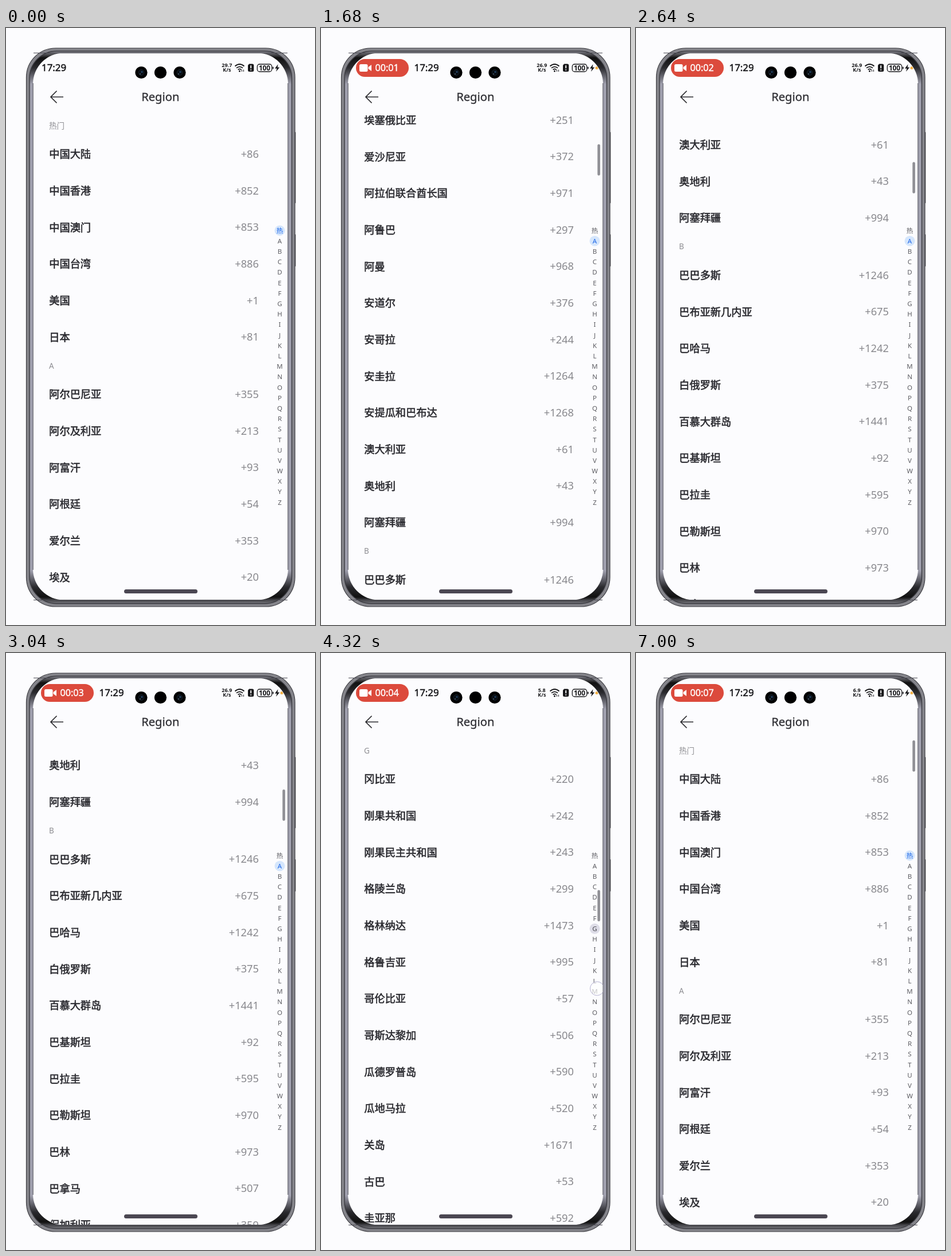
Write an HTML page that moves like this. It is 539 by 1039 pixels and loops after 7160 ms.

```html
<!DOCTYPE html>
<html lang="zh-CN">
<head>
<meta charset="utf-8">
<title>Region</title>
<style>
html, body { margin: 0; width: 100%; height: 100%; overflow: hidden; background: #fcfcfe; }
svg { display: block; width: 539px; height: 1039px; }
text { font-family: "Noto Sans", "Noto Sans CJK SC", sans-serif; }
.name { font: 18.2px "Noto Sans CJK SC", "Noto Sans CJK", sans-serif; fill: #2b2b30; stroke: #2b2b30; stroke-width: .6px; }
.code { font-size: 18.3px; fill: #88888d; text-anchor: end; }
.head { font-size: 13.5px; fill: #8e8e93; }
.idx { font-size: 11.5px; fill: #5c5c62; text-anchor: middle; }
.mid { text-anchor: middle; }
.bold { font-weight: 700; }
</style>
</head>
<body>
<svg viewBox="0 0 539 1039">
  <defs>
    <linearGradient id="rim" x2="0" y2="1">
      <stop offset="0" stop-color="#8a8a92"/><stop offset=".012" stop-color="#111"/>
      <stop offset=".03" stop-color="#2a2a2e"/><stop offset=".06" stop-color="#a0a0ae"/>
      <stop offset=".94" stop-color="#a0a0ae"/><stop offset=".97" stop-color="#2a2a2e"/>
      <stop offset=".988" stop-color="#111"/><stop offset="1" stop-color="#77777e"/>
    </linearGradient>
    <clipPath id="screen"><rect x="47.5" y="44" width="444" height="951" rx="54"/></clipPath>
    <clipPath id="view"><rect x="47" y="152" width="445" height="843"/></clipPath>
  </defs>

  <g fill="#55555b">
    <rect x="502" y="181" width="3.4" height="124" rx="1"/>
    <rect x="502" y="359" width="3.4" height="56" rx="1"/>
  </g>
  <rect x="35.5" y="35" width="468.5" height="972" rx="51" fill="#85858b" stroke="#3c3c42" stroke-width="1.2"/>
  <rect x="41" y="40.3" width="457.5" height="961.5" rx="47" fill="url(#rim)" stroke="#3a3a40" stroke-width="1.4"/>
  <rect x="47" y="43.5" width="445" height="952" rx="54" fill="#fcfcfe"/>
  <path d="M48 43.5H491M48 995.5H491M47.2 96V943M491.8 96V943" stroke="#4c4c54"/>

  <g clip-path="url(#screen)">
    <g clip-path="url(#view)"><g id="list"></g></g>
    <g id="index"><circle id="mark" cx="477.5" r="9"/></g>
    <rect id="bar" x="482.3" width="4.6" height="54.5" rx="2.3" fill="#8f8f95"/>
    <circle id="touch" cx="481.5" r="12" fill="#fff" fill-opacity=".65" stroke="#b4b0d0" stroke-width="1"/>
    <rect x="206" y="977" width="128" height="7" rx="3.5" fill="#4b4752"/>

    <path d="M100 120H78.5M88.5 109.5L78 120L88.5 130.5" fill="none" stroke="#2a2a2e" stroke-width="1.7"/>
    <text x="269.3" y="127" class="mid" font-size="20.2" fill="#2f2f34" stroke="#2f2f34" stroke-width=".3">Region</text>

    <g id="pill">
      <rect id="pillBox" x="61" y="54" height="31" rx="15.5" fill="#dc4a3c"/>
      <g id="pillIn" fill="#fff">
        <rect x="67" y="63" width="14.5" height="13" rx="2.5"/>
        <path d="M82.5 68L88 64V75L82.5 71Z"/>
        <text id="timer" x="94.5" y="75.3" font-size="16.2" stroke="#fff" stroke-width=".4"></text>
      </g>
    </g>
    <text id="clock" y="75.4" font-size="16.9" fill="#17171a" stroke="#17171a" stroke-width=".5">17:29</text>

    <g fill="#17171a">
      <text id="speed" x="385.3" y="68" class="mid bold" font-size="9"></text>
      <text x="385.3" y="76.4" class="mid bold" font-size="9">K/s</text>
      <g fill="none" stroke="#17171a" stroke-width="1.7">
        <path d="M399.5 66.5Q407.5 59.5 415.5 66.5M402 69.7Q407.5 65 413 69.7M404.6 72.6Q407.5 70.2 410.4 72.6"/>
      </g>
      <circle cx="407.5" cy="75" r="1.5"/>
      <path d="M411.5 76V72.5M414.5 72.5V76" stroke="#17171a"/>
      <path d="M424 62.5H430Q432.3 62.5 432.3 65V73.5Q432.3 76 430 76H424.5Q422 76 422 73.5V65Z"/>
      <path d="M427.2 65V70.2M427.2 72V73.8" stroke="#fff" stroke-width="1.8"/>
      <g id="battery">
        <rect x="438.3" y="63" width="25.4" height="13" rx="4" fill="none" stroke="#17171a" stroke-width="1.3"/>
        <text x="451" y="73.8" class="mid bold" font-size="11.8">100</text>
        <rect x="464.8" y="67.5" width="1.8" height="4" rx=".8"/>
        <path d="M474.5 63L469 70.5H472.5L471 76L477.2 68.4H473.6Z"/>
      </g>
    </g>
    <g id="mic">
      <circle r="9" fill="#f3b045"/>
      <g id="micIcon" fill="none" stroke="#fff" stroke-width="1.3">
        <rect x="-1.7" y="-5" width="3.4" height="6.5" rx="1.7" fill="#fff" stroke="none"/>
        <path d="M-3.8 -.5Q-3.5 3.4 0 3.4T3.8 -.5M0 3.4V5.6"/>
      </g>
    </g>
  </g>

  <g id="cameras">
    <circle cx="269.5" cy="77.5" r="10.6"/>
  </g>
</svg>
<script>
const $ = id => document.getElementById(id);
const LOOP = 7160, TOP = 151.5, ROW = 63.67, HEAD = 36;
const LETTERS = '热ABCDEFGHIJKLMNOPQRSTUVWXYZ';
const hotEnd = HEAD + 6 * ROW, aEnd = hotEnd + HEAD + 18 * ROW;

// letter, scroll position, rows
const sections = [
  ['热', 0, '中国大陆 86,中国香港 852,中国澳门 853,中国台湾 886,美国 1,日本 81'],
  ['A', hotEnd, '阿尔巴尼亚 355,阿尔及利亚 213,阿富汗 93,阿根廷 54,爱尔兰 353,埃及 20,埃塞俄比亚 251,爱沙尼亚 372,阿拉伯联合酋长国 971,阿鲁巴 297,阿曼 968,安道尔 376,安哥拉 244,安圭拉 1264,安提瓜和巴布达 1268,澳大利亚 61,奥地利 43,阿塞拜疆 994'],
  ['B', aEnd, '巴巴多斯 1246,巴布亚新几内亚 675,巴哈马 1242,白俄罗斯 375,百慕大群岛 1441,巴基斯坦 92,巴拉圭 595,巴勒斯坦 970,巴林 973,巴拿马 507,保加利亚 359,巴西 55,贝宁 229'],
  ['G', 4454, '冈比亚 220,刚果共和国 242,刚果民主共和国 243,格陵兰岛 299,格林纳达 1473,格鲁吉亚 995,哥伦比亚 57,哥斯达黎加 506,瓜德罗普岛 590,瓜地马拉 520,关岛 1671,古巴 53,圭亚那 592'],
  ['M', 7200, '马达加斯加 261,马尔代夫 960,马耳他 356,马拉维 265,马来西亚 60,马里 223,马其顿 389,马提尼克 596,毛里求斯 230,毛里塔尼亚 222,蒙古 976,孟加拉国 880,秘鲁 51'],
  ['T', 10300, '塔吉克斯坦 992,泰国 66,坦桑尼亚 255,汤加 676,特立尼达和多巴哥 1868,突尼斯 216,土耳其 90,土库曼斯坦 993,瓦努阿图 678,危地马拉 502,委内瑞拉 58,文莱 673,乌干达 256']
];
// index taps: time of the jump, letter
const taps = [[3760, 'G'], [4400, 'M'], [5240, 'T'], [6200, '热']];

function add(parent, tag, attrs, text = '') {
  const el = document.createElementNS('http://www.w3.org/2000/svg', tag);
  for (const k in attrs) el.setAttribute(k, attrs[k]);
  el.textContent = text;
  parent.append(el);
  return el;
}
const set = (id, attrs) => { for (const k in attrs) $(id).setAttribute(k, attrs[k]); };
const indexY = i => 352.5 + i * 18.19;

for (const [letter, start, rows] of sections) {
  const y = TOP + start;
  add($('list'), 'text', {class: 'head', x: 75, y: y + 23}, letter == '热' ? '热门' : letter);
  rows.split(',').forEach((row, i) => {
    const [name, code] = row.split(' '), mid = y + HEAD + (i + .5) * ROW;
    add($('list'), 'text', {class: 'name', x: 75.3, y: mid + 6.9}, name);
    add($('list'), 'text', {class: 'code', x: 441, y: mid + 6.6}, '+' + code);
  });
}
const marks = [...LETTERS].map((c, i) => add($('index'), 'text', {class: 'idx', x: 477.5, y: indexY(i) + 4.2}, c));
for (const x of [236, 303]) {
  add($('cameras'), 'circle', {cx: x, cy: 77.5, r: 10.6});
  add($('cameras'), 'circle', {cx: x, cy: 77.5, r: 5, fill: '#080d13', stroke: '#18222c'});
  add($('cameras'), 'circle', {cx: x + 1, cy: 76.5, r: 1.8, fill: '#1f3c5a'});
  add($('cameras'), 'circle', {cx: x - 2, cy: 80, r: .9, fill: '#5a6f80'});
}

const clamp = v => Math.max(0, Math.min(1, v));
const ease = (t, a, b) => { const p = clamp((t - a) / (b - a)); return 1 - (1 - p) ** 3; };
const fling = (t, start, dist) => t < start ? 0 : dist * (1 - Math.exp(-3.85 * (t - start) / 1000));
const startOf = letter => sections.find(s => s[0] == letter)[1];

function draw(t) {
  const tap = taps.filter(p => t >= p[0]).pop();
  const scroll = tap ? startOf(tap[1])
    : t < 2160 ? fling(t, 950, 914) : 902 + fling(t, 2160, 578);
  set('list', {transform: `translate(0 ${-scroll})`});
  set('bar', {y: 152 + scroll * .0585, opacity: clamp((t - 950) / 120)});

  const current = sections.filter(s => s[1] <= scroll + 1).pop()[0];
  const at = LETTERS.indexOf(current), pressed = tap && current != '热';
  set('mark', {cy: indexY(at), fill: pressed ? '#dedde8' : '#d5e6fc'});
  marks.forEach((m, i) => m.style.fill = i == at && !pressed ? '#1f68e8' : i == at ? '#45454c' : '');

  const near = taps.find(p => t > p[0] - 120 && t < p[0] + 160);
  set('touch', {
    cy: near ? indexY(LETTERS.indexOf(near[1])) - 5 : 0,
    opacity: near ? clamp((t - near[0] + 120) / 40) * clamp((near[0] + 160 - t) / 80) : 0
  });

  const rec = ease(t, 160, 520);
  set('pill', {opacity: clamp(rec * 3)});
  set('pillBox', {width: 31 + 61 * rec});
  set('pillIn', {opacity: clamp(rec * 2 - 1)});
  set('clock', {x: 62 + 100.5 * rec});
  $('timer').textContent = '00:0' + Math.floor(t / 1000);
  $('speed').textContent = t < 1500 ? '29.7' : t < 3800 ? '26.9' : t < 5800 ? '5.8' : '6.9';

  // the microphone badge pushes the battery aside, then shrinks to a dot
  const grow = ease(t, 360, 640), shrink = ease(t, 1300, 1640), push = grow - shrink;
  set('mic', {
    transform: `translate(${447.3 + 33.7 * shrink} 69.5) scale(${grow * (1 - .72 * shrink)})`,
    opacity: clamp(grow * 2)
  });
  set('micIcon', {opacity: 1 - shrink});
  set('battery', {transform: `translate(${30 * push} 0)`, opacity: 1 - .85 * push});
}

function tick(now) {
  draw(now % LOOP);
  requestAnimationFrame(tick);
}
draw(0);
requestAnimationFrame(tick);
</script>
</body>
</html>
```
